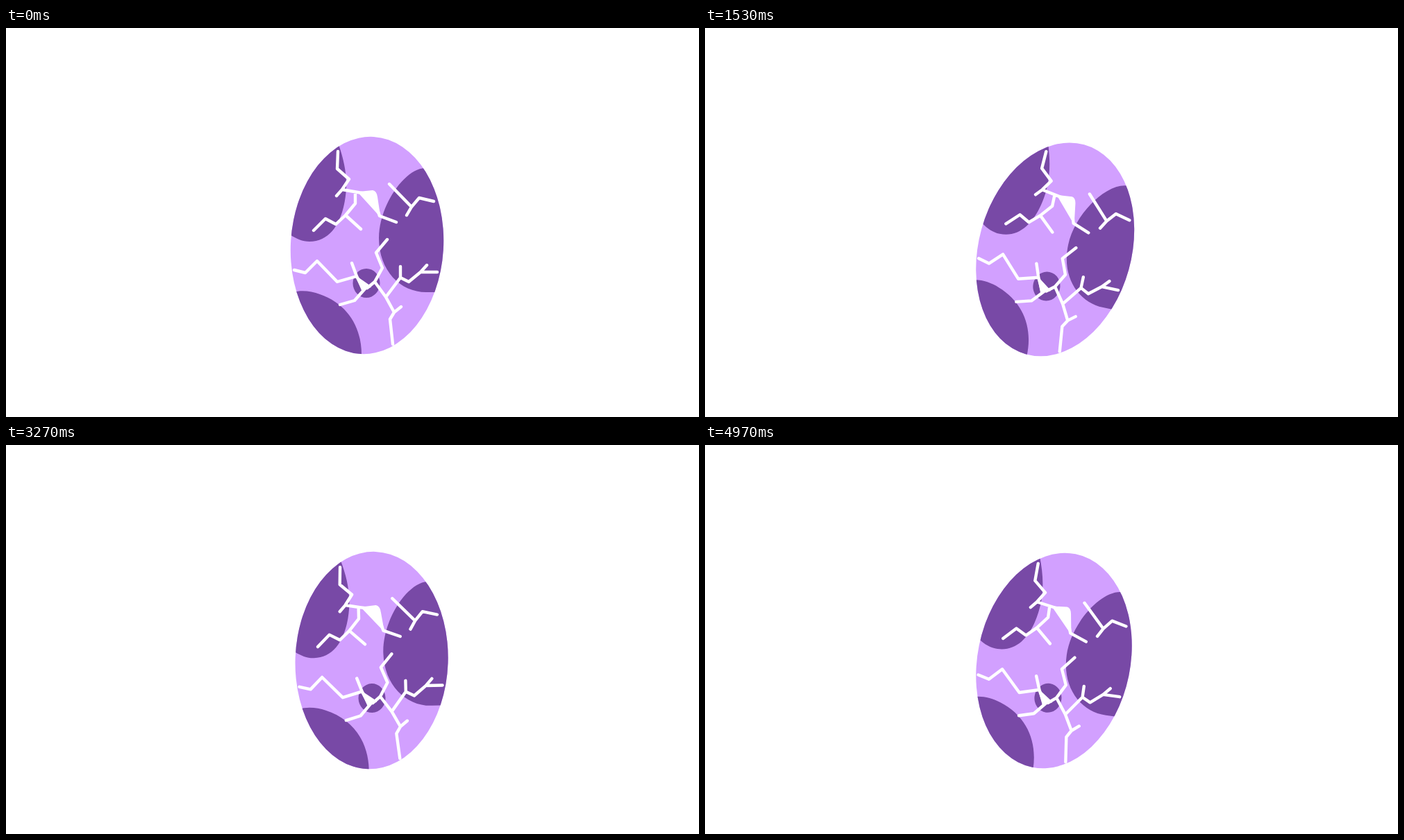
An HTML page for the animation above (5.01 s loop, 998 px wide and 561 px high).

```html
<!DOCTYPE html>
<html lang="en">
<head>
<meta charset="utf-8">
<title>Wobbling egg</title>
<style>
  html, body { margin: 0; width: 100%; height: 100%; overflow: hidden; background: #fff; }
  svg { display: block; }
  .shell { fill: #d2a0ff; }
  .spots { fill: #7849a6; }
  .cracks { fill: none; stroke: #fff; stroke-width: 4.4; stroke-linecap: round; stroke-linejoin: round; }
  .chips { fill: #fff; stroke: #fff; stroke-width: 2; stroke-linejoin: round; }
</style>
</head>
<body>
<svg width="998" height="561" viewBox="0 0 998 561">
  <defs>
    <ellipse id="shell" cx="520" cy="313.5" rx="110" ry="156.8" transform="rotate(3.5 520 313.5)"/>
    <clipPath id="inside"><use href="#shell"/></clipPath>
  </defs>
  <g id="egg">
    <use href="#shell" class="shell"/>
    <g class="spots" clip-path="url(#inside)">
      <path d="M479 168C486 188 491 210 490 232C487 275 470 308 437 308C427 308 418 304 409 298H380V150Z"/>
      <path d="M603 202C574 203 537 256 537 303C537 350 568 381 605 381H650V202Z"/>
      <path d="M414 381C424 378 440 379 452 384C492 398 513 432 512 474H390V381Z"/>
      <ellipse cx="519" cy="368" rx="19.5" ry="21"/>
    </g>
    <path class="cracks" d="M478 178L477 203L494 218L484 233L476 242M484 233L513 238M503 237V253L489 270L511 290M489 270L475 283L460 275L443 292M535 262L538 271L562 280
      M552 225L584 258L577 270M584 258L595 245L616 250
      M415 349L431 353L448 336L477 366L505 358M498 339L505 358L514 376
      M517 376L502 393L481 399M520 375L531 366L542 346L533 324L549 305
      M531 366L547 388L559 410L569 402M559 410L553 420L557 456
      M547 388L568 360V344M568 360L580 366L597 352H621M597 352L606 342"/>
    <path class="chips" d="M508 237L528 235Q533 236 534 244L538 270ZM505 359L513 378L525 373Z"/>
  </g>
</svg>
<script>
const LOOP = 5010, FRAME = 100 / 3, SWING = 500;
const REST = { x: 513.5, y: 316.5, tilt: 4.5 };

// Poses the egg swings through, between them it rocks about the rest pose
const poses = [
  { t: 0, x: 520, y: 313.5, tilt: 0 },
  { t: 733, x: 522.6, y: 322.8, tilt: 4.6 },
  { t: 1533, x: 504.2, y: 319.4, tilt: 12 },
  { t: 2833, x: 528, y: 309.3, tilt: -0.8 },
  { t: 3667, x: 526.1, y: 311.4, tilt: -2.5 },
  { t: 4233, x: 523, y: 319.5, tilt: 4.5 },
  { t: 4967, x: 502.5, y: 311, tilt: 8 }
];

function rock(time) {
  const t = Math.min(time, poses.at(-1).t);
  const i = Math.max(1, poses.findIndex(p => p.t >= t));
  const from = poses[i - 1], to = poses[i], span = to.t - from.t;
  const u = (t - from.t) / span;
  const swing = Math.cos(2 * Math.PI * u * Math.round(span / SWING));
  const at = c => REST[c] + (from[c] + (to[c] - from[c]) * u - REST[c]) * swing;
  return `translate(${at("x")} ${at("y")}) rotate(${at("tilt")}) translate(-520 -313.5)`;
}

const egg = document.getElementById("egg");
const start = performance.now();

function draw() {
  const t = (performance.now() - start) % LOOP;
  egg.setAttribute("transform", rock(Math.floor((t + 4) / FRAME) * FRAME));
  requestAnimationFrame(draw);
}
draw();
</script>
</body>
</html>
```
